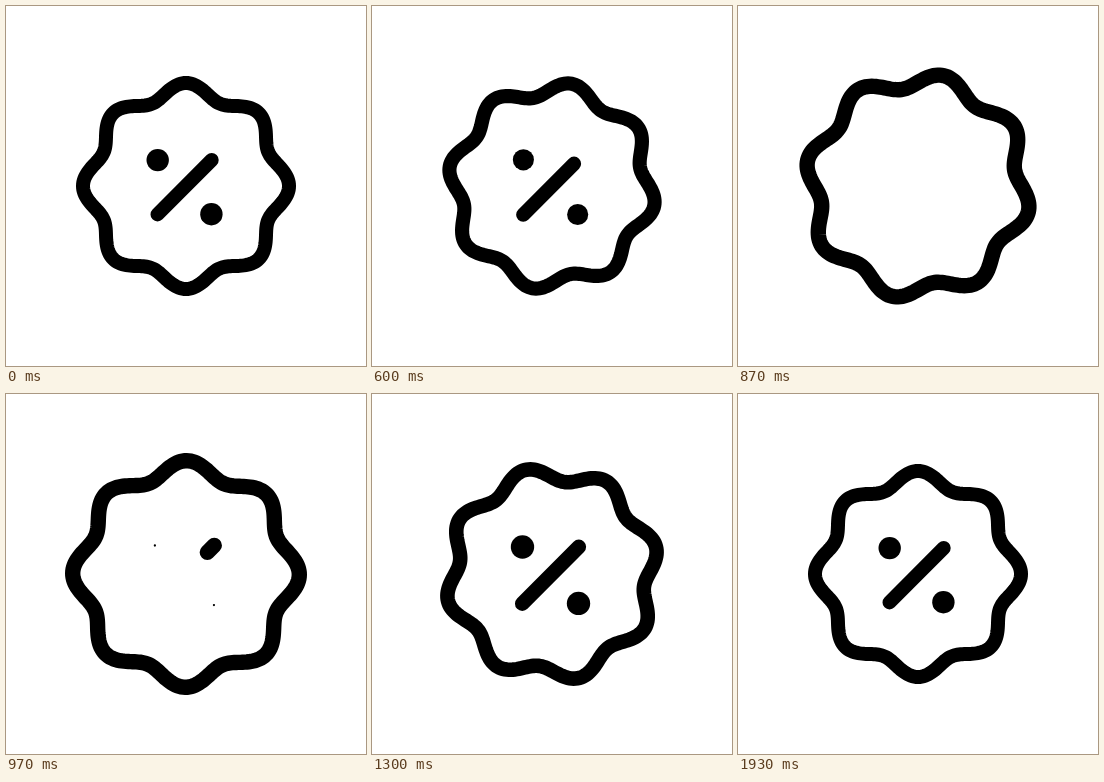
Write an HTML page that moves like this. It is 360 by 360 pixels and loops after 1.96 s.

```html
<!DOCTYPE html>
<html lang="en">
<head>
<meta charset="utf-8">
<title>Discount badge</title>
<style>
  html, body { margin: 0; width: 100%; height: 100%; overflow: hidden; background: #fff; }
  svg { display: block; width: 100%; height: 100%; }
</style>
</head>
<body>
<svg viewBox="-180 -180 360 360">
  <g id="icon" stroke="#000" stroke-linecap="round">
    <path id="badge" fill="none" stroke-width="14"/>
    <path id="slash" stroke-width="14"/>
    <g stroke="none">
      <circle class="dot" cx="-28.3" cy="-25.9"/>
      <circle class="dot" cx="25.4" cy="28.2"/>
    </g>
  </g>
</svg>
<script>
const LOOP = 1960;
const icon = document.getElementById('icon');
const badge = document.getElementById('badge');
const slash = document.getElementById('slash');
const dots = document.querySelectorAll('.dot');

const progress = (t, start, end) => Math.min(1, Math.max(0, (t - start) / (end - start)));
const smooth = s => s * s * (3 - 2 * s);
const cubic = s => s < 0.5 ? 4 * s ** 3 : 1 - 4 * (1 - s) ** 3;
const ease = (t, start, end) => smooth(progress(t, start, end));

// Eight-lobed outline
const outline = Array.from({ length: 360 }, (_, i) => {
  const a = i * Math.PI / 180, r = 96 + 7 * Math.cos(8 * a);
  return (r * Math.cos(a)).toFixed(2) + ',' + (r * Math.sin(a)).toFixed(2);
});
badge.setAttribute('d', 'M' + outline.join('L') + 'Z');

// Point on the slash: 0 = lower left, 1 = upper right
const slashPoint = k => `${-28.5 + 54.2 * k},${28.4 - 54.4 * k}`;

function draw(t) {
  const scale = 1 + 0.1 * (ease(t, 540, 840) - ease(t, 1110, 1460));
  icon.setAttribute('transform', `scale(${scale})`);

  const turn = 180 * cubic(progress(t, 240, 1700));
  badge.setAttribute('transform', `rotate(${turn})`);

  // Erases towards the lower left, then redraws from the upper right
  const erasing = t < 870;
  const from = erasing ? 0 : 1 - ease(t, 920, 1160);
  const to = erasing ? 1 - ease(t, 560, 810) : 1;
  slash.setAttribute('d', to > from ? `M${slashPoint(from)}L${slashPoint(to)}` : '');

  const radius = 11.2 * (1 - ease(t, 570, 765) + ease(t, 925, 1170));
  dots.forEach(dot => dot.setAttribute('r', radius));
}

function tick() {
  draw(performance.now() % LOOP);
  requestAnimationFrame(tick);
}
tick();
</script>
</body>
</html>
```
